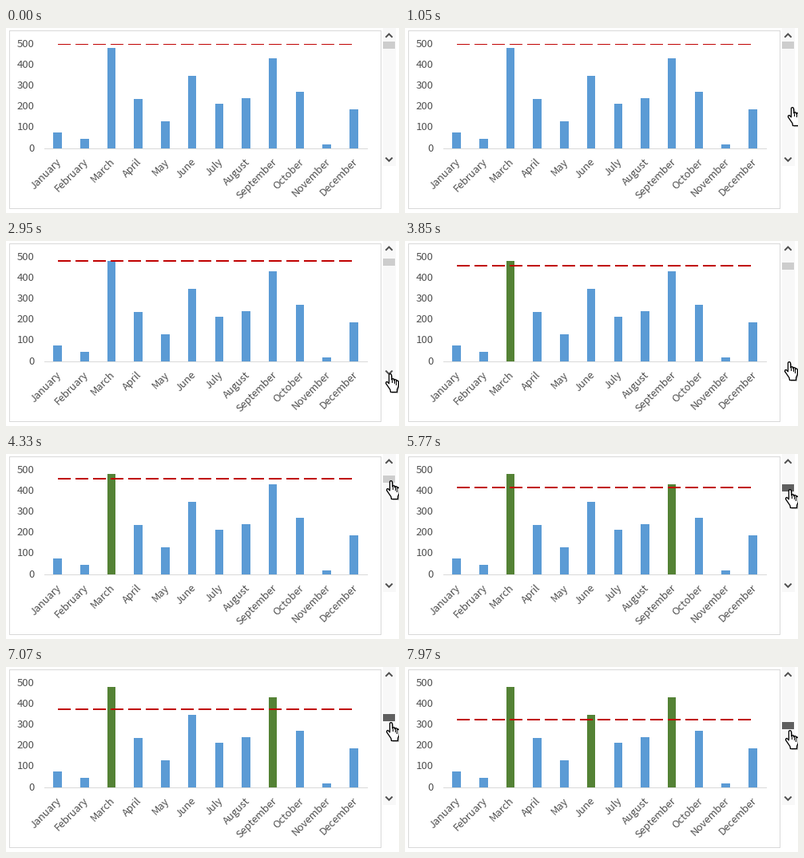
Animation of 492 by 232 pixels, one loop 8 s. Source, as a matplotlib script:

```python
import numpy as np
import matplotlib.pyplot as plt
from matplotlib.animation import FuncAnimation
from matplotlib.patches import Polygon, Rectangle

W, H, DPI = 492, 232, 64
STEP, LOOP = 20, 8000
PT = 72 / DPI  # points per pixel
FONT = "Noto Sans CJK JP"
BLUE, GREEN, RED = "#5B9BD5", "#548235", "#C00000"
GREY, INK, TRACK = "#D9D9D9", "#505050", "#F8F8F8"
THUMB, DARK = "#CDCDCD", "#606060"

MONTHS = ["January", "February", "March", "April", "May", "June", "July",
          "August", "September", "October", "November", "December"]
SALES = [76, 46, 480, 237, 130, 347, 214, 240, 431, 271, 19, 187]
BASE, SCALE = 151, 0.262
LEFT, SLOT = 47.9, 33.7

# each click lowers the limit by 10, each drag sets it on release
CLICKS = [2410, 2830, 3280, 3700]
DRAGS = [(4660, 5140, 416), (5770, 6500, 374), (6860, 7290, 325),
         (7820, LOOP, 290)]
# hand moves: start, end, x, y
MOVES = [(690, 1380, 477, 174), (1510, 1690, 477, 168),
         (1980, 2010, 475, 166), (3790, 4330, 476, 33)]
ENTRY = 493, 17

fig = plt.figure(figsize=(W / DPI, H / DPI), dpi=DPI, facecolor="white")
ax = fig.add_axes([0, 0, 1, 1])
ax.set(xlim=(0, W), ylim=(H, 0))
ax.axis("off")


def box(x, y, w, h, color):
    patch = Rectangle((x, y), w, h, fc=color, ec="none", antialiased=False)
    return ax.add_patch(patch)


def label(x, y, text, size, **kw):
    ax.text(x, y, text, family=FONT, fontsize=size * PT, color=INK,
            ha="right", va="baseline", **kw)


def chevron(y, dy):
    return ax.plot([476, 479.5, 483], [y, y + dy, y], color=INK,
                   lw=2 * PT, solid_joinstyle="miter")[0]


def hand_shape():
    """Outline of a pointing hand and the lines between its fingers."""
    fingers = [(4.5, .7), (8, 6.8), (10.9, 7.8), (13.4, 9.2)]
    outline, lines = [(4.5, 12.8)], []
    for x, y in fingers:
        outline += [(x, y + 1), (x + .8, y), (x + 2.2, y), (x + 3, y + 1)]
    for x, y in fingers[1:]:
        lines += [(x, y), (x, y + 4.3), (np.nan, np.nan)]
    outline += [(16.3, 16.5), (14.7, 20), (14.5, 23.5), (6.5, 23.5),
                (6, 20.5), (.6, 12.6), (.8, 11), (2.2, 10.4)]
    return np.array(outline), np.array(lines)


# chart area
box(4, 3, 466, 224, GREY)
box(5, 4, 464, 222, "white")
box(48, BASE, 405, 1, GREY)
for v in range(0, 501, 100):
    label(35.8, BASE - SCALE * v + 3.7, str(v), 13.2)

bars = []
for i, (month, v) in enumerate(zip(MONTHS, SALES)):
    mid = LEFT + SLOT * (i + .5)
    x0, x1 = round(mid - 5.4), round(mid + 5.1)
    top = round(BASE - SCALE * v)
    bars.append(box(x0, top, x1 - x0, BASE - top, BLUE))
    label(mid + 5, 168.5, month, 12.8, rotation=45, rotation_mode="anchor")

limit, = ax.plot([65, 434.5], [20, 20], color=RED, lw=2 * PT, dashes=(8, 3),
                 dash_capstyle="butt")
limit.set_clip_path(Rectangle((0, 20), W, H, transform=ax.transData))

# scroll bar
box(472, 0, 16, 173, TRACK)
button = box(472, 157, 16, 16, TRACK)
thumb = box(472, 17, 15, 9, THUMB)
chevron(11, -3.5)
down = chevron(163.3, 3.5)

HAND, KNUCKLES = hand_shape()
shadow = ax.add_patch(Polygon(HAND, fc="black", ec="none", alpha=.25,
                              zorder=4))
hand = ax.add_patch(Polygon(HAND, fc="white", ec="black", lw=1.3 * PT,
                            joinstyle="round", zorder=5))
knuckles, = ax.plot([], [], color="black", lw=PT, zorder=6)


def progress(t, start, end):
    return min(max((t - start) / (end - start), 0), 1)


def ease_out(u):
    return 1 - (1 - u) ** 3


def levels(t):
    """Limit shown in the chart and level under the moving thumb."""
    shown = held = 500 - 10 * sum(t >= c + 30 for c in CLICKS)
    for start, end, goal in DRAGS:
        held += (goal - held) * ease_out(progress(t, start, end))
        if t >= end - 20:
            shown = goal
    return shown, held


def hand_at(t, top):
    x, y = ENTRY
    for start, end, goal_x, goal_y in MOVES:
        u = progress(t, start, end)
        x += (goal_x - x) * ease_out(u)
        y += (goal_y - y) * u
    if t > DRAGS[0][0]:
        y = top + 6 + 4 * progress(t, *DRAGS[1][:2])
    return np.round([x, y])


def draw(k):
    t = k * STEP + STEP / 2
    shown, held = levels(t)
    y = round(BASE + .2 - SCALE * shown)
    limit.set_ydata([y, y])
    for bar, v in zip(bars, SALES):
        bar.set_facecolor(GREEN if v > shown else BLUE)

    top = int(17.5 + (500 - held) / 4)
    dragging = any(a <= t < b for a, b, _ in DRAGS)
    thumb.set_y(top)
    thumb.set_facecolor(DARK if dragging else THUMB)

    pressed = any(c <= t < c + 90 for c in CLICKS)
    button.set_facecolor(DARK if pressed else TRACK)
    down.set_color("white" if pressed else INK)

    pos = hand_at(t, top)
    hand.set_xy(HAND + pos)
    shadow.set_xy(HAND + pos + 1.5)
    knuckles.set_data(*(KNUCKLES + pos).T)
    return []


anim = FuncAnimation(fig, draw, frames=LOOP // STEP, interval=STEP,
                     repeat=True, repeat_delay=0, init_func=lambda: draw(0))
plt.show()
```
